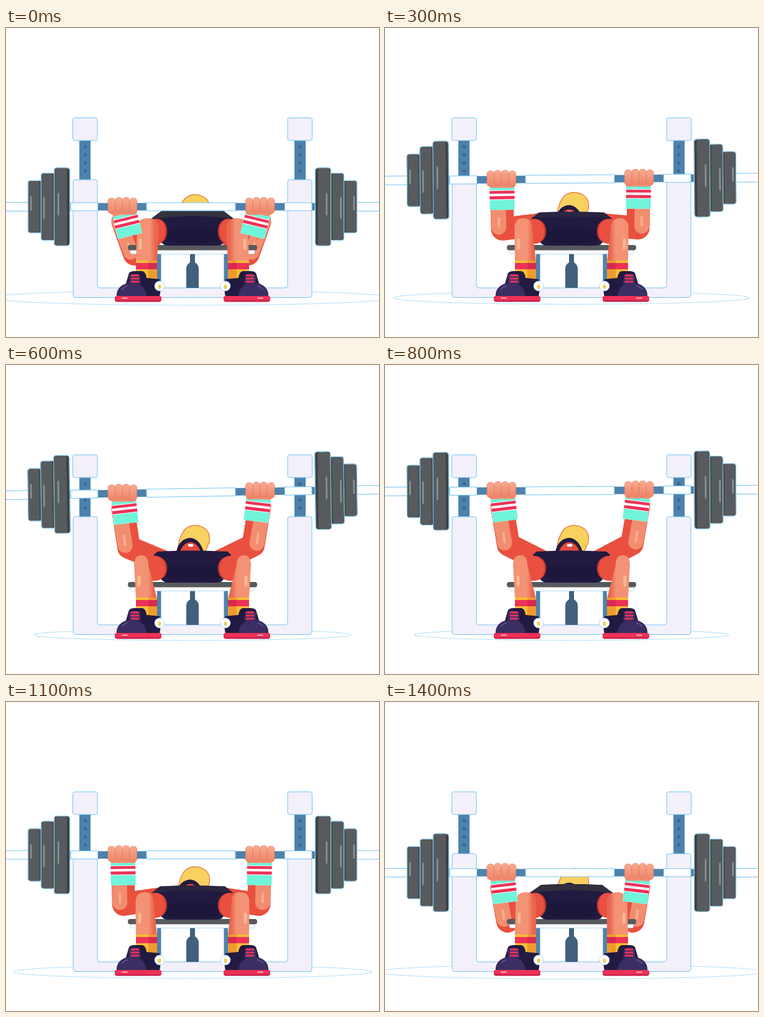
Animation, 600 px wide and 497 px high, one loop 1.5 s. Source, as an HTML page:

```html
<!DOCTYPE html>
<html lang="en">
<head>
<meta charset="utf-8">
<title>Bench press</title>
<style>
html, body { margin: 0; width: 100%; height: 100%; overflow: hidden; background: #fff; }
svg { display: block; width: 600px; height: 497px; }
</style>
</head>
<body>
<svg id="stage" viewBox="0 0 600 497" xmlns="http://www.w3.org/2000/svg">
  <defs>
    <linearGradient id="shin">
      <stop offset=".6" stop-color="#f39274"/><stop offset=".85" stop-color="#ea664f"/>
    </linearGradient>
    <linearGradient id="finger" x2="0" y2="1">
      <stop offset="0" stop-color="#f8ab90"/><stop offset="1" stop-color="#ee8469"/>
    </linearGradient>
  </defs>
  <g id="scene"></g>
</svg>
<script>
const STEP = 100;
const GRIP_AXIS = 596; // the lifter's grip sits slightly left of the rack's centre
const barY = [287.5, 275, 259, 243, 227.5, 215, 205, 200, 202, 209, 221, 246, 269, 273, 274.5];
const tilt = [0, .15, .3, .45, .6, .75, .85, .6, .3, .1, 0, 0, 0, 0, 0];

// bar height, elbow x, elbow y
const elbowKeys = [
  [199, 199, 285], [206, 198, 293], [221, 189, 302], [228, 188, 308],
  [259, 190, 338], [269, 195, 348], [274, 197, 352], [288, 207, 364]
];

const EDGE = '#74c5f2', NAVY = '#221a40', SKIN = '#e9503f', LIGHT = '#f28e70';
const RED = '#ee3157', MINT = '#70f4da', STEEL = '#4d82ad', FRAME = '#f3f0fa';

const mix = (a, b, k) => a + (b - a) * k;
const rect = (x, y, w, h, fill, r = 0, more = '') =>
  `<rect x="${x}" y="${y}" width="${w}" height="${h}" rx="${r}" fill="${fill}" ${more}/>`;
const path = (d, fill, more = '') => `<path d="${d}" fill="${fill}" ${more}/>`;
const dot = (x, y, rx, ry, fill, more = '') =>
  `<ellipse cx="${x}" cy="${y}" rx="${rx}" ry="${ry}" fill="${fill}" ${more}/>`;
const line = (d, color, w) =>
  path(d, 'none', `stroke="${color}" stroke-width="${w}" stroke-linecap="round" stroke-linejoin="round"`);
const flip = (s, axis = 600) => `<g transform="translate(${axis} 0) scale(-1 1)">${s}</g>`;
const both = (s, axis) => s + flip(s, axis);
const edge = `stroke="${EDGE}" stroke-width="1"`;
const dotted = edge + ' stroke-dasharray="2 1.5"';

function elbowAt(y) {
  let i = 1;
  while (i < elbowKeys.length - 1 && elbowKeys[i][0] < y) i++;
  const a = elbowKeys[i - 1], b = elbowKeys[i];
  const k = (y - a[0]) / (b[0] - a[0]);
  return [mix(a[1], b[1], k), mix(a[2], b[2], k)];
}

function floor(y) {
  const d = y - 205;
  return dot(300, 434, 255 + d * .82, 9 + d * .035, 'none', dotted);
}

function rack() {
  const holes = [191, 204, 217, 230].map(y => dot(127.5, y, 2.8, 2.8, '#3a6b97')).join('');
  const post = rect(118, 180, 18, 66, STEEL) + holes + rect(107.5, 144.5, 39.5, 36.5, FRAME, 3, edge);
  return both(post) +
    path('M108 247Q108 244 111 244H144Q147 244 147 247V414Q147 418 151 418H449Q453 418 453 414V247' +
      'Q453 244 456 244H489Q492 244 492 247V429Q492 433.500 488 433.500H112Q108 433.500 108 429Z', FRAME, edge);
}

function bench() {
  return path('M296 362H304V377Q310 381 310 387V418H290V387Q290 381 296 377Z', '#40607d') +
    both(rect(243, 362, 6.5, 56, STEEL)) +
    rect(200, 355, 200, 8.500, '#fff', 3, dotted) +
    rect(196, 349, 208, 8.500, '#56595d', 4);
}

function armBase(y) {
  const [x, e] = elbowAt(y);
  return line(`M188 ${y + 24}L${x} ${e}L252 316`, SKIN, 37) +
    line(`M182 ${y + 24}L${x - 6} ${e - 3}`, LIGHT, 24) +
    line(`M${mix(184, x - 6, .75)} ${mix(y, e, .78)}L${x - 6} ${e - 4}`, '#f7ad8c', 4);
}

function hand(y) {
  const [x, e] = elbowAt(y);
  const angle = -Math.atan2(x - 188, e - y) * 180 / Math.PI;
  const cuff = rect(-19, 5, 38, 10, LIGHT, 4) + rect(-20, 12, 40, 36.500, '#fff', 1) +
    rect(-20, 12, 40, 5, MINT) + rect(-20, 18, 40, 4.500, RED) +
    rect(-20, 26.500, 40, 5, RED) + rect(-20, 32.500, 40, 16, MINT);
  const fingers = [0, 1, 2, 3].map(i =>
    rect(-24 + i * 11.7, -15 + (i % 3 ? 0 : 1), 11.5, 25, 'url(#finger)', 5,
      'stroke="#e67a63" stroke-width=".7"')).join('');
  return `<g transform="translate(188 ${y})"><g transform="rotate(${angle})">${cuff}</g>` +
    rect(-20, 2, 41, 11, LIGHT, 4) + fingers + '</g>';
}

function plate(x, w, h, shineX, shineY, shineH) {
  return rect(x - .8, -h / 2 - .8, w + 1.6, h + 1.6, '#fff', 4.5, edge) +
    rect(x, -h / 2, w, h, '#3c4146', 4) +
    rect(x, -h / 2, w - 4, h, '#575b5d', 3) +
    rect(shineX, shineY, 2.5, shineH, '#8f9293', 1);
}

function bar(y, a) {
  const grip = rect(98, -6, 8, 12, STEEL) + rect(104, -6.500, 44, 13, '#fff', 0, edge) +
    rect(148, -6, 79, 12, STEEL);
  const weights = rect(-2, -7, 42, 14, '#fff', 0, edge) +
    plate(36, 22, 83, 39, -17, 23) + plate(57, 22, 107, 60, -16, 36) +
    plate(78, 24, 124, 83, -22, 36);
  return `<g transform="translate(0 ${y}) rotate(${-a} 300 0)">` +
    both(grip, GRIP_AXIS) + both(weights) +
    rect(226, -6.500, 143, 13, '#fff', 0, edge) + '</g>';
}

function head(k) {
  const cap = Math.min(10, mix(14, 0, k)), face = mix(17, 2, k);
  return `<g transform="translate(0 ${cap})">` +
    path('M276 299Q278 275 289 263Q302 254 317 261Q330 268 327 285L321 299Z', '#f9d15e',
      'stroke="#e2733f" stroke-width="1.2"') + '</g>' +
    `<g transform="translate(0 ${face})">` +
    path('M274 298Q279 277 297 276Q312 278 318 299Z', NAVY) +
    path('M279 300Q285 283 297 283Q308 284 314 300Z', '#e04a3c') +
    dot(297, 288, 4.500, 2.300, '#fff') + '</g>';
}

function shorts(k) {
  const top = mix(293, 300, k), inset = mix(252, 244, k), side = mix(232, 238, k);
  const low = top + mix(15, 5, k);
  return path(`M${inset} ${top}Q300 ${top - 3} ${600 - inset} ${top}L${600 - side} ${low}` +
      `L352 340Q350 350 338 350H262Q250 350 248 340L${side} ${low}Z`, NAVY) +
    path(`M${inset} ${top}Q300 ${top - 2} ${600 - inset} ${top}L${600 - side} ${low}` +
      `Q300 ${top + 4} ${side} ${low}Z`, '#35333f', `opacity="${1 - k}"`) +
    path('M258 325Q300 318 342 325V342Q300 352 258 342Z', '#1b1438', 'opacity=".55"');
}

function leg(k) {
  const l = mix(211, 206, k), r = mix(246, 229, k), m = (l + r) / 2;
  return rect(m, 307, 259 - m, 40, '#cf3d32', 19) + rect(m, 307, 256 - m, 40, SKIN, 18) +
    path(`M${l} 322Q${l} 306 ${m} 306Q${r} 306 ${r} 322L243 376H209Z`, 'url(#shin)') +
    line(`M${mix(216, 214, k)} 341V354`, '#f8b992', 5) +
    rect(209, 374, 34, 30, '#f8bd35') + rect(229, 374, 14, 30, '#f09a2d') +
    rect(209, 378, 34, 10, RED) + rect(229, 378, 14, 10, '#d92950');
}

function shoe() {
  const laces = [398, 403, 408].map(y => line(`M202 ${y}H213`, RED, 3)).join('');
  return path('M197 397Q198 391 206 391H219Q225 392 226 402L247 404Q250 420 247 432H178Q177 417 193 411Z', NAVY) +
    path('M179 432Q178 418 191 412Q205 407 216 413Q226 420 226 432Z', '#3a2e63') +
    path('M197 399Q205 392 215 397L217 411Q208 415 198 411Z', '#3a2e63') + laces +
    line('M187 420Q190 416 195 415', '#5a4d86', 2) +
    rect(175, 431, 75, 9.500, '#c91f49', 4) + rect(175, 431, 75, 7, RED, 3.5) +
    line('M187 434.500H195', '#fbd5dc', 1.6) +
    dot(247, 415, 8, 8, '#fff', dotted) + dot(247, 416, 2.6, 3.6, '#f0cf52');
}

function draw(i) {
  const y = barY[i], a = tilt[i];
  const k = Math.max(0, Math.min(1, (288 - y) / 83));
  const lean = 112 * Math.tan(a * Math.PI / 180);
  const left = y + lean, right = y - lean;
  return floor(y) + rack() + armBase(left) + flip(armBase(right), GRIP_AXIS) + bench() +
    head(k) + shorts(k) + both(leg(k) + shoe()) + bar(y, a) +
    hand(left) + flip(hand(right), GRIP_AXIS);
}

const scene = document.getElementById('scene');
let shown = -1;
function tick(now) {
  const i = Math.floor(now / STEP) % barY.length;
  if (i !== shown) scene.innerHTML = draw(shown = i);
  requestAnimationFrame(tick);
}
tick(0);
</script>
</body>
</html>
```
